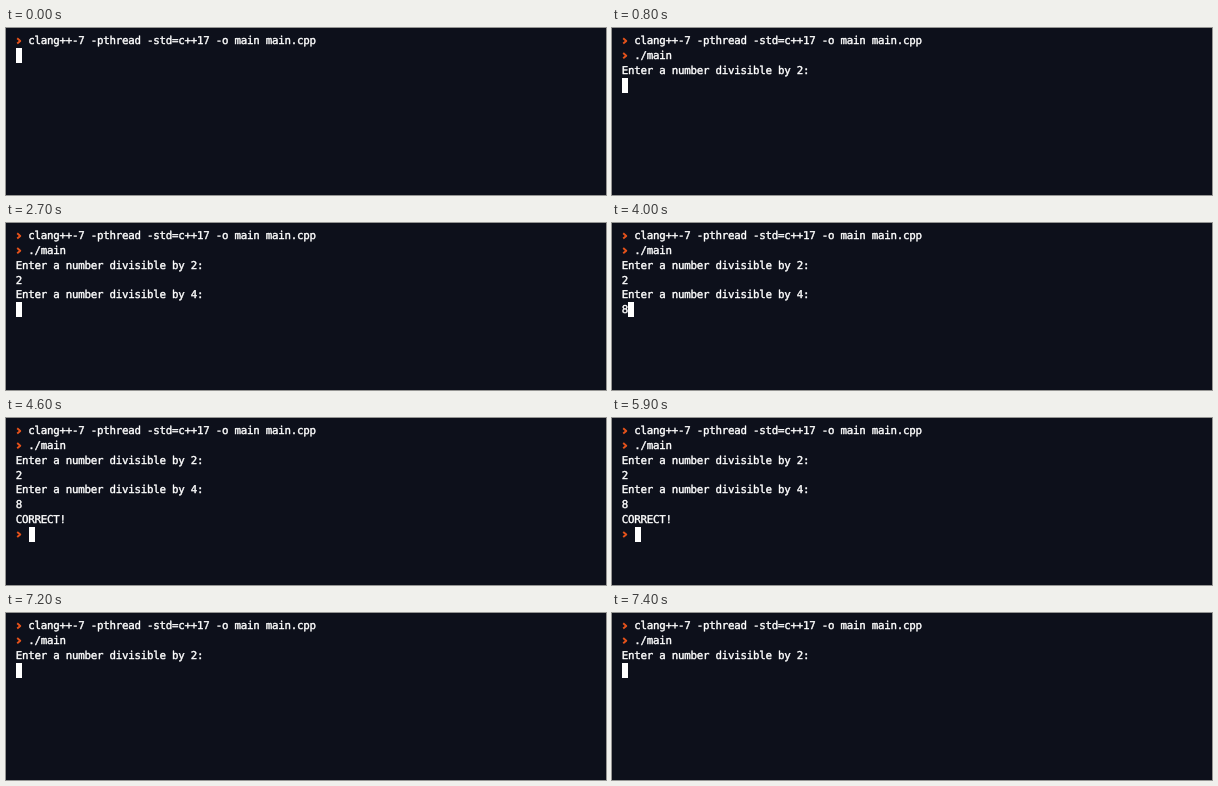
An HTML page with a canvas that plays this animation: 600x167 px, repeating every 8 s.

```html
<!DOCTYPE html>
<html lang="en">
<head>
<meta charset="utf-8">
<title>Terminal session</title>
<style>
  html, body { margin: 0; width: 100%; height: 100%; overflow: hidden; background: #0d101b; }
  canvas { display: block; }
</style>
</head>
<body>
<canvas id="screen" width="600" height="167"></canvas>
<script>
const ctx = document.getElementById('screen').getContext('2d');
const LOOP = 8000;
const LEFT = 10, TOP = 5.3, CELL_W = 6.25, CELL_H = 14.8, BASELINE = 10.8;
const BG = '#0d101b', INK = '#ffffff', PROMPT = '#e4521b';

// A leading ">" marks a shell prompt; the cursor follows the last character.
const compile = '> clang++-7 -pthread -std=c++17 -o main main.cpp\n';
const ask2 = compile + '> ./main\nEnter a number divisible by 2:\n';
const ask4 = ask2 + '2\nEnter a number divisible by 4:\n';
const done = ask4 + '8\nCORRECT!\n> ';

const steps = [
  [0, compile],
  [800, ask2],
  [2300, ask2 + '2'],
  [2700, ask4],
  [4000, ask4 + '8'],
  [4600, done],
  [6000, compile],
  [7200, ask2]
];

const colX = col => LEFT + col * CELL_W;
const rowY = row => TOP + row * CELL_H;

function drawPrompt(row) {
  const y = rowY(row) + 7.6;
  ctx.strokeStyle = PROMPT;
  ctx.lineWidth = 1.9;
  ctx.beginPath();
  ctx.moveTo(11.2, y - 2.6);
  ctx.lineTo(14.3, y);
  ctx.lineTo(11.2, y + 2.6);
  ctx.stroke();
}

// A thin outline gives the text its slightly heavy weight.
function drawChar(ch, col, row) {
  const x = colX(col + 0.5), y = rowY(row) + BASELINE;
  ctx.strokeStyle = INK;
  ctx.lineWidth = 0.4;
  ctx.fillText(ch, x, y);
  ctx.strokeText(ch, x, y);
}

function drawLine(line, row) {
  [...line].forEach((ch, col) => {
    if (ch === '>' && col === 0) drawPrompt(row);
    else if (ch !== ' ') drawChar(ch, col, row);
  });
}

function drawCursor(col, row) {
  ctx.fillRect(Math.round(colX(col)), Math.round(rowY(row)), 6, 15);
}

function draw(text) {
  ctx.fillStyle = BG;
  ctx.fillRect(0, 0, 600, 167);
  ctx.font = '10.8px "DejaVu Sans Mono", monospace';
  ctx.textAlign = 'center';
  ctx.textRendering = 'geometricPrecision';
  ctx.lineJoin = 'round';
  ctx.fillStyle = INK;
  const lines = text.split('\n');
  lines.forEach(drawLine);
  const last = lines.length - 1;
  drawCursor(lines[last].length, last);
}

function tick(now) {
  const t = now % LOOP;
  draw(steps.findLast(([start]) => t >= start)[1]);
  requestAnimationFrame(tick);
}

tick(0);
</script>
</body>
</html>
```
